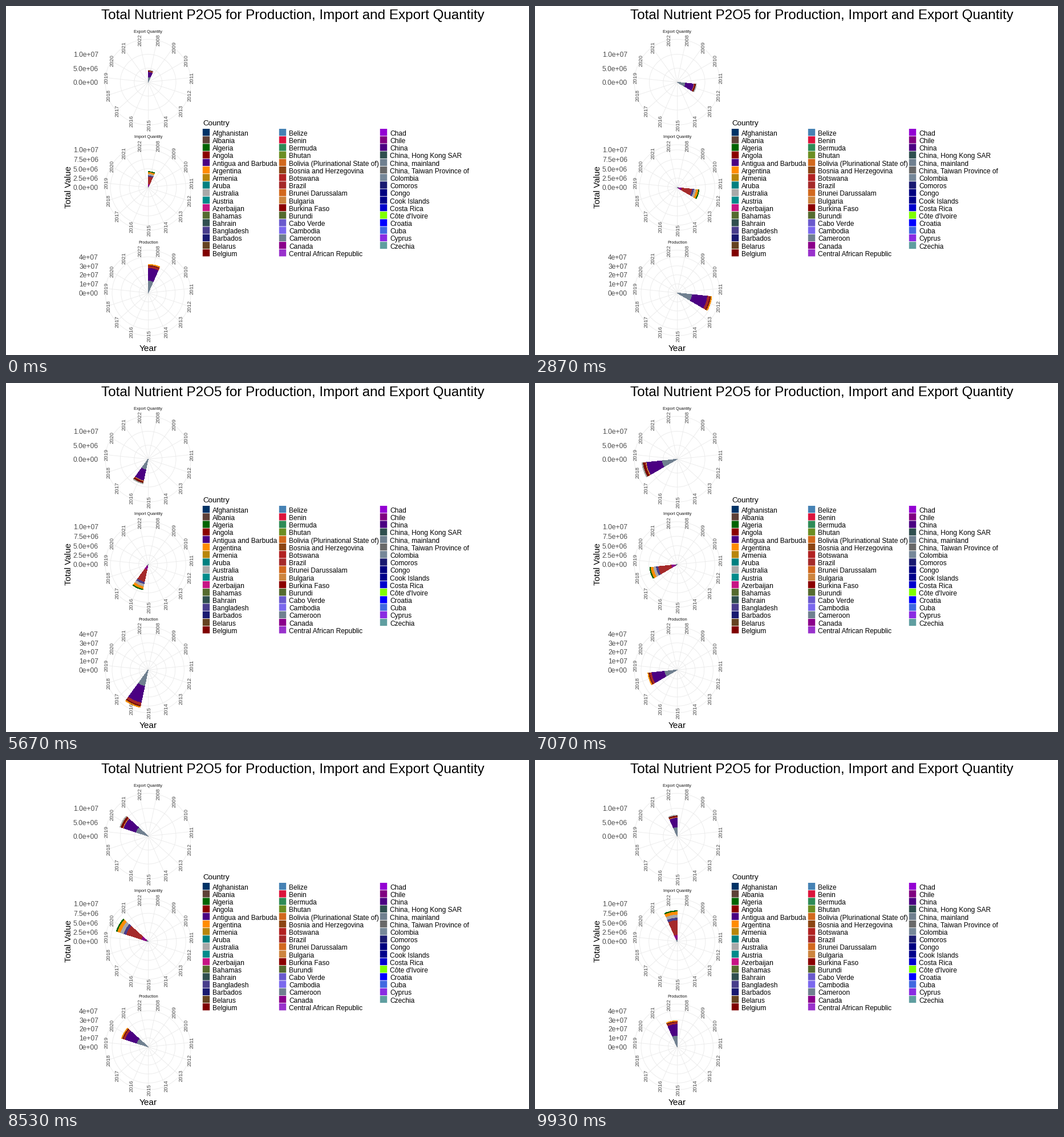
A matplotlib script for the animation above (10000 ms loop, 917x611 px).

```python
import numpy as np
import matplotlib
import matplotlib.pyplot as plt
from matplotlib.animation import FuncAnimation
from matplotlib.patches import Circle, Rectangle, Wedge

W, H, DPI = 917, 611, 64
PT = 72 / DPI  # points per pixel
FRAMES, LOOP = 200, 10000
YEARS = range(2008, 2023)
STEP = 360 / len(YEARS)
CX, RIM = 249.2, 75

matplotlib.rcParams["font.family"] = "Liberation Sans"
GRID, AXIS_TEXT = "#EBEBEB", "#4D4D4D"

LEGEND = [
    (345, [
        ("Afghanistan", "#003366"), ("Albania", "#5D4037"),
        ("Algeria", "darkgreen"), ("Angola", "darkred"),
        ("Antigua and Barbuda", "indigo"), ("Argentina", "darkorange"),
        ("Armenia", "darkgoldenrod"), ("Aruba", "teal"),
        ("Australia", "darkgray"), ("Austria", "darkcyan"),
        ("Azerbaijan", "mediumvioletred"), ("Bahamas", "darkolivegreen"),
        ("Bahrain", "darkslategray"), ("Bangladesh", "darkslateblue"),
        ("Barbados", "midnightblue"), ("Belarus", "#654321"),
        ("Belgium", "maroon"),
    ]),
    (479, [
        ("Belize", "steelblue"), ("Benin", "crimson"),
        ("Bermuda", "seagreen"), ("Bhutan", "olivedrab"),
        ("Bolivia (Plurinational State of)", "chocolate"),
        ("Bosnia and Herzegovina", "saddlebrown"), ("Botswana", "firebrick"),
        ("Brazil", "brown"), ("Brunei Darussalam", "chocolate"),
        ("Bulgaria", "peru"), ("Burkina Faso", "darkred"),
        ("Burundi", "darkolivegreen"), ("Cabo Verde", "slateblue"),
        ("Cambodia", "mediumslateblue"), ("Cameroon", "slategray"),
        ("Canada", "darkmagenta"), ("Central African Republic", "darkorchid"),
    ]),
    (656, [
        ("Chad", "darkviolet"), ("Chile", "purple"), ("China", "indigo"),
        ("China, Hong Kong SAR", "darkslategray"),
        ("China, mainland", "slategray"),
        ("China, Taiwan Province of", "dimgray"),
        ("Colombia", "lightslategray"), ("Comoros", "midnightblue"),
        ("Congo", "navy"), ("Cook Islands", "darkblue"),
        ("Costa Rica", "mediumblue"), ("Côte d'Ivoire", "chartreuse"),
        ("Croatia", "blue"), ("Cuba", "royalblue"),
        ("Cyprus", "blueviolet"), ("Czechia", "cadetblue"),
    ]),
]
COLOR = {name: c for _, column in LEGEND for name, c in column}

# trend: turning points (year index, radius), straight lines between them.
# stack: where each country's part ends, as a share of the radius.
PANELS = [
    dict(title="Export Quantity", tick=5e6, ticks=3, fmt=".1e", gap=24.4,
         trend=[(0, 21), (1, 23), (3, 48), (4, 34), (6, 47), (7, 67),
                (8, 44), (10, 62), (12, 52), (13, 64), (14, 37)],
         stack={"China, mainland": .44, "China": .88, "Bulgaria": .91,
                "Belgium": .97, "Belarus": .985, "Australia": 1}),
    dict(title="Import Quantity", tick=2.5e6, ticks=5, fmt=".1e", gap=16.5,
         trend=[(0, 28), (1, 20), (3, 37), (11, 50), (13, 67), (14, 54)],
         stack={"Colombia": .06, "Chile": .12, "Canada": .22, "Brazil": .7,
                "Bangladesh": .78, "Australia": .88, "Argentina": .98,
                "Algeria": 1}),
    dict(title="Production", tick=1e7, ticks=5, fmt=".0e", gap=15.8,
         trend=[(0, 50), (2, 64), (3, 65), (5, 57), (8, 67), (9, 53),
                (14, 46)],
         stack={"China, mainland": .44, "China": .88, "Brazil": .95,
                "Belgium": .97, "Belarus": .985, "Argentina": 1}),
]

fig = plt.figure(figsize=(W / DPI, H / DPI), dpi=DPI, facecolor="white")
ax = fig.add_axes([0, 0, 1, 1])
ax.set(xlim=(0, W), ylim=(H, 0))
ax.axis("off")


def label(x, y, text, size, color="black", ha="left", rotation=0):
    ax.text(x, y, text, fontsize=size * PT, color=color, ha=ha,
            va="baseline", rotation=rotation, rotation_mode="anchor",
            zorder=3)


def draw_grid(p, cy):
    line = dict(lw=.9 * PT, zorder=1)
    for i in range(p["ticks"]):
        r = i * p["gap"]
        ax.add_patch(Circle((CX, cy), r or RIM, fill=False, ec=GRID, **line))
        label(162, cy - r + 4.7, f"{i * p['tick']:{p['fmt']}}", 12,
              AXIS_TEXT, "right")
    for k, year in enumerate(YEARS):
        a = np.radians((k + .5) * STEP)
        x, y = CX + RIM * np.sin(a), cy - RIM * np.cos(a)
        ax.plot([CX, x], [cy, y], color=GRID, **line)
        label(x + 4.3, y, str(year), 9.4, AXIS_TEXT, "center", 90)
    label(CX, cy - 86.4, p["title"], 7.3, "#1A1A1A", "center")


def make_bar(p, cy):
    return [ax.add_patch(Wedge((CX, cy), 1, 0, 1, fc=COLOR[name], lw=0,
                               antialiased=False, zorder=2))
            for name in p["stack"]]


def set_bar(p, k):
    radius, inner = np.interp(k, *zip(*p["trend"])), 0
    for part, share in zip(p["bar"], p["stack"].values()):
        outer = radius * share
        part.set(radius=outer, width=outer - inner,
                 theta1=k * STEP - 90, theta2=(k + 1) * STEP - 90)
        inner = outer


def draw_legend():
    label(345, 209, "Country", 13.4)
    for x, column in LEGEND:
        for row, (name, color) in enumerate(column):
            y = 215 + 13.19 * row
            ax.add_patch(Rectangle((x - .2, y), 12.4, 12.3, fc=color, lw=0,
                                   snap=False))
            label(x + 17, y + 11.8, name, 12)


label(503, 23, "Total Nutrient P2O5 for Production, Import and Export Quantity",
      24.3, ha="center")
label(114, 317, "Total Value", 15.1, ha="center", rotation=90)
label(CX, 604, "Year", 15.4, ha="center")
draw_legend()
for n, panel in enumerate(PANELS):
    cy = 133.3 + 184.5 * n
    draw_grid(panel, cy)
    panel["bar"] = make_bar(panel, cy)

# Years are spread over 150 ticks of 1/15 s, first and last on the end ticks.
ticks = [int(k * 149 / 14 + .5) for k in range(len(YEARS))]
starts = [t * FRAMES // 150 for t in ticks]


def update(i):
    year = np.searchsorted(starts, i, side="right") - 1
    for p in PANELS:
        set_bar(p, year)
    return []


anim = FuncAnimation(fig, update, frames=FRAMES, init_func=lambda: update(0),
                     interval=LOOP / FRAMES, repeat=True, repeat_delay=0)
plt.show()
```
